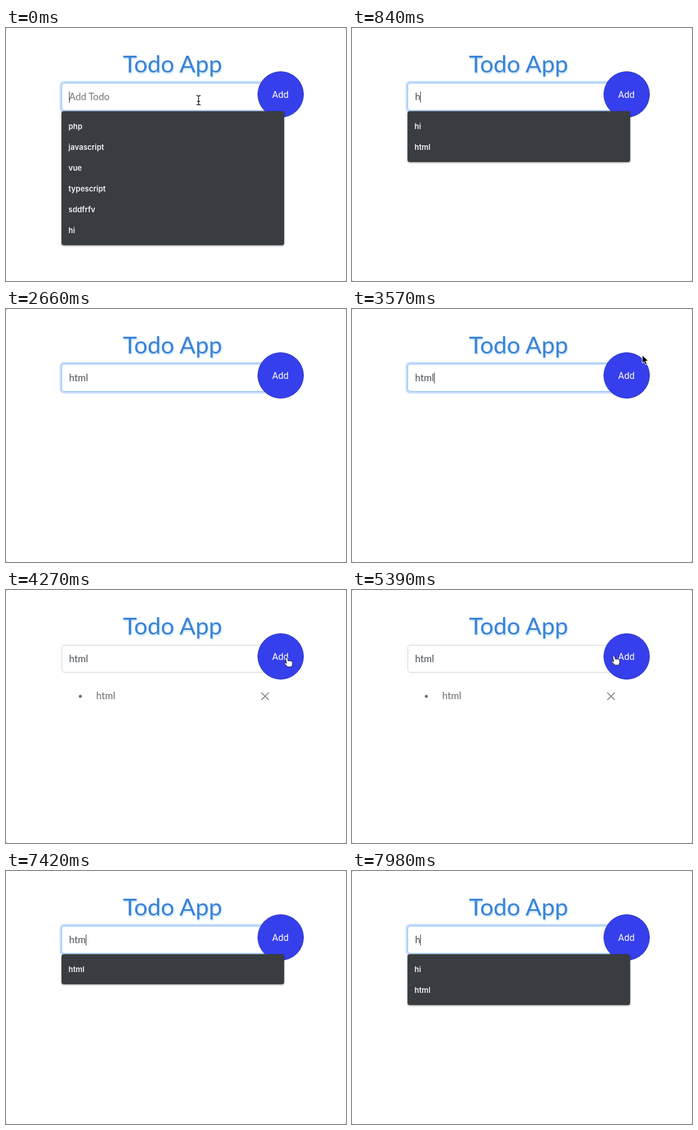
An HTML page that plays this animation: 588 px wide and 438 px high, repeating every 8 s.

```html
<!DOCTYPE html>
<html lang="en">
<head>
<meta charset="utf-8">
<title>Todo App</title>
<style>
  html, body { margin: 0; width: 100%; height: 100%; overflow: hidden; background: #8a8a8a; }
  svg { display: block; }
  text { font: 16.8px Lato, sans-serif; }
  #title { font-size: 41px; fill: #3b82d6; text-shadow: 1px 2px 3px #b4dcf8; }
  #add { font: 16px Roboto, sans-serif; fill: #fff; }
  #menu text { font: 600 13px Inter, sans-serif; fill: #f4f4f4; }
  #panel { fill: #3a3d40; filter: drop-shadow(0 1px 1.5px #0007); }
</style>
</head>
<body>
<svg width="588" height="438" viewBox="0 0 588 438">
  <rect width="588" height="438" rx="2" fill="#fff"/>
  <text id="title" x="288" y="77" text-anchor="middle">Todo App</text>

  <g id="item" fill="#6a6a6a">
    <circle cx="128.5" cy="184" r="2.6"/>
    <text x="156" y="189">html</text>
    <path d="M441.5 177.500l13 13m0-13l-13 13" stroke="#777" stroke-width="1.6"/>
  </g>

  <rect id="glow" x="94.4" y="93.400" width="388.200" height="51.200" rx="5.500" fill="none" stroke="#c2dcfc" stroke-width="3.200"/>
  <rect x="96.500" y="95.500" width="384" height="47" rx="4" fill="#fff" stroke="#d0d3d7"/>
  <rect id="focus" x="96.500" y="95.500" width="384" height="47" rx="4" fill="none" stroke="#90bdf3"/>
  <text id="field" x="109" y="125"></text>
  <path id="caret" d="M0 110v19" stroke="#333"/>

  <circle cx="475" cy="115" r="39.500" fill="#363fec" stroke="#2a35b8"/>
  <text id="add" x="474.500" y="121" text-anchor="middle">Add</text>

  <g id="menu">
    <rect id="panel" x="96" y="144" width="385" rx="4"/>
    <g id="options"></g>
  </g>

  <g id="cursor" stroke-linejoin="round" stroke-linecap="round">
    <g id="beam" fill="none">
      <path d="M-3-8q3 0 3 2q0-2 3-2M0-6v12M-3 8q3 0 3-2q0 2 3 2M-2 2h4" stroke="#fff" stroke-width="3"/>
      <path d="M-3-8q3 0 3 2q0-2 3-2M0-6v12M-3 8q3 0 3-2q0 2 3 2M-2 2h4" stroke="#111" stroke-width="1.300"/>
    </g>
    <path id="arrow" d="M0 0v14l3.200-3l2.300 5.300l2.600-1.100l-2.300-5.200h4.400z" fill="#000" stroke="#fff"/>
    <path id="hand" d="M-1.500 1q1.500-2 3 0l1.500 5q1.500-1.500 2.500 0q1.500-1.200 2.500.4q1.800-.8 2.200 1l.3 4l-1.500 4.600h-7l-5.500-6q.5-2 3.500-.2z" fill="#fff" stroke="#222"/>
  </g>
</svg>
<script>
const $ = id => document.getElementById(id);
const LOOP = 8000, STEP = 70;

const typed = [[0, ''], [700, 'h'], [980, 'ht'], [1400, 'htm'], [2100, 'html'],
  [7350, 'htm'], [7700, 'ht'], [7910, 'h']];
const hints = [[0, 'php javascript vue typescript sddfrfv hi'], [770, 'hi html'],
  [1050, 'html'], [2100, ''], [7420, 'html'], [7910, 'hi html']];
const caretOn = [[0, 70], [560, 1960], [2100, 2660], [3150, 3640], [6440, 7000], [7350, LOOP]];
const cursorOn = [[0, 700], [2800, 7350]];
// Pointer path: time, x, y
const path = [[0, 333, 125], [2800, 333, 125], [2870, 350, 108], [3010, 377, 44],
  [3150, 392, 28], [3290, 428, 7], [3360, 452, 10], [3570, 502, 80], [3640, 503, 82],
  [3920, 485, 117], [5250, 485, 117], [5530, 420, 111], [5810, 330, 111], [6020, 311, 114]];

const last = (list, t) => list.filter(k => k[0] <= t).pop();
const within = (spans, t) => spans.some(([a, b]) => t >= a && t < b);
const ramp = (t, from) => Math.min(1, Math.max(0, (t - from) / 150));
const show = (id, on) => $(id).setAttribute('visibility', on ? 'visible' : 'hidden');

function pointer(t) {
  const a = last(path, t), b = path[path.indexOf(a) + 1] || a;
  const u = a === b ? 0 : (t - a[0]) / (b[0] - a[0]);
  return [a[1] + (b[1] - a[1]) * u, a[2] + (b[2] - a[2]) * u];
}

function drawCursor(t) {
  const [x, y] = pointer(t), seen = within(cursorOn, t);
  const hand = Math.hypot(x - 475, y - 115) < 40;
  const inField = x > 96 && x < 481 && y > 95 && y < 143;
  const inTitle = x > 200 && x < 376 && y > 45 && y < 85;
  const beam = !hand && (inField || inTitle);
  $('cursor').setAttribute('transform', `translate(${x} ${y})`);
  show('hand', seen && hand);
  show('beam', seen && beam);
  show('arrow', seen && !hand && !beam);
}

let shownHints = null;
function drawMenu(t) {
  const words = last(hints, t)[1];
  if (words === shownHints) return;
  shownHints = words;
  const rows = words ? words.split(' ') : [];
  $('menu').style.display = rows.length ? '' : 'none';
  $('panel').setAttribute('height', rows.length * 36 + 16);
  $('options').innerHTML = rows.map((w, i) => `<text x="108" y="${175 + i * 36}">${w}</text>`).join('');
}

function draw(now) {
  const t = Math.floor(now % LOOP / STEP) * STEP;
  const text = last(typed, t)[1], field = $('field');
  field.textContent = text || 'Add Todo';
  field.setAttribute('fill', text ? '#495057' : '#73777b');
  const caretX = Math.round(109 + (text ? field.getComputedTextLength() : 0)) + .5;
  $('caret').setAttribute('transform', `translate(${caretX} 0)`);
  show('caret', within(caretOn, t));

  const focus = 1 - ramp(t, 3950) + ramp(t, 6400);
  $('glow').setAttribute('opacity', focus);
  $('focus').setAttribute('opacity', focus);
  show('item', t >= 4060);
  drawMenu(t);
  drawCursor(t);
  requestAnimationFrame(draw);
}

const start = performance.now();
const tick = () => draw(performance.now() - start);
function frame() {
  tick();
}
draw = (step => function () { step(performance.now() - start); })(draw);
frame();
</script>
</body>
</html>
```
